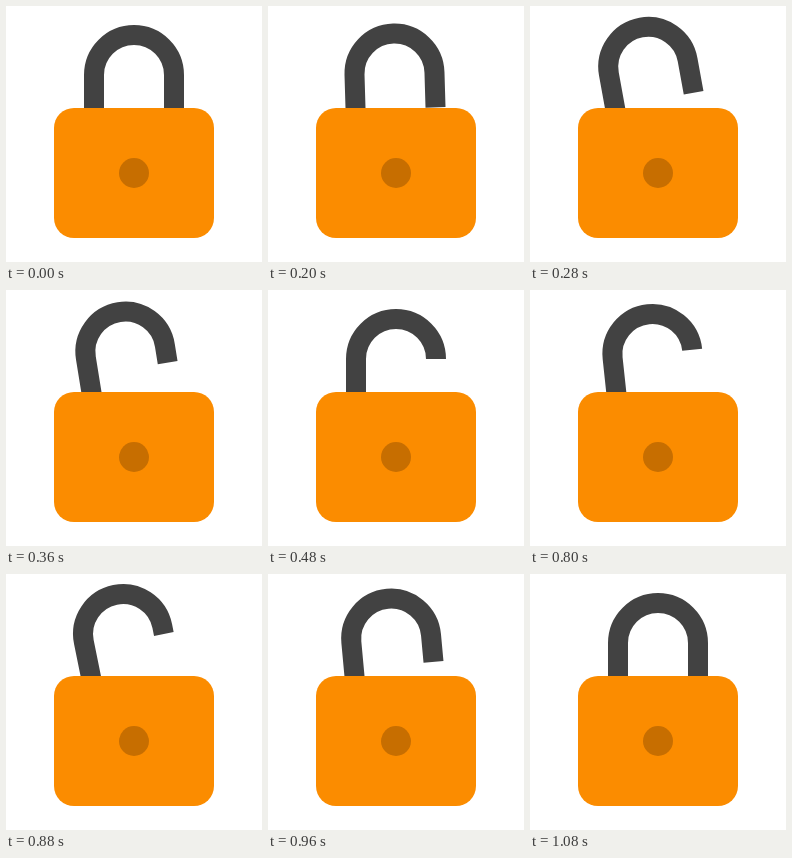
An HTML page that plays this animation: 256x256 px, repeating every 1160 ms.

```html
<!DOCTYPE html>
<html lang="en">
<head>
<meta charset="utf-8">
<title>Padlock</title>
<style>
  html, body { margin: 0; width: 100%; height: 100%; overflow: hidden; background: #fff; }
  svg { display: block; width: 100vw; height: 100vh; }
</style>
</head>
<body>
<svg viewBox="0 0 256 256">
  <path id="shackle" fill="none" stroke="#424242" stroke-width="20"/>
  <rect x="48" y="102" width="160" height="130" rx="20" fill="#fb8c00"/>
  <circle cx="128" cy="167" r="15" fill="#c76e00"/>
</svg>
<script>
  const LOOP = 1160, STEP = 40, OPEN = 160, CLOSE = 720, MOVE = 320;
  const TILT = 11.6, LEG = 35;
  const shackle = document.getElementById('shackle');

  function ease(from, to, t) {
    const u = Math.min(1, Math.max(0, (t - from) / (to - from)));
    return u * u * (3 - 2 * u);
  }

  // Milliseconds into the current swing; closing lingers just before it lands.
  function phaseAt(t) {
    if (t < CLOSE) return t - OPEN;
    return t < 1080 ? Math.min(t - CLOSE, MOVE - STEP) : MOVE;
  }

  function draw(now) {
    const t = Math.floor((now % LOOP) / STEP) * STEP;
    const phase = phaseAt(t);
    const angle = TILT * (ease(5, 150, phase) - ease(150, MOVE, phase));
    const slide = ease(95, 305, phase);
    const leg = LEG * (t < CLOSE ? 1 - slide : slide);
    shackle.setAttribute('d', `M88 119V69a40 40 0 0 1 80 0v${leg}`);
    shackle.setAttribute('transform', `rotate(${-angle} 78 119)`);
  }

  const start = performance.now();
  function tick() {
    draw(performance.now() - start);
    requestAnimationFrame(tick);
  }
  tick();
</script>
</body>
</html>
```
